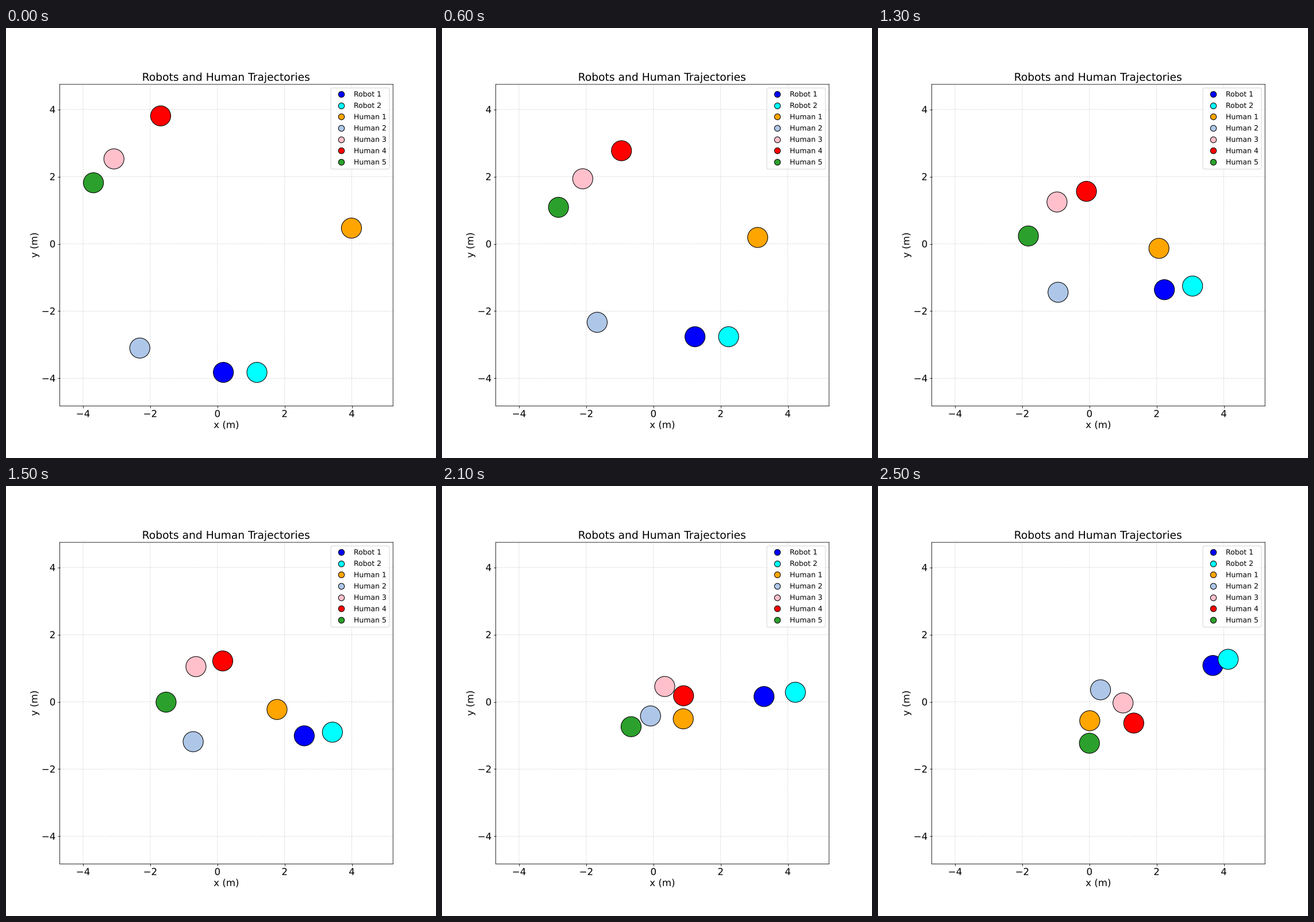
A matplotlib script that plays this animation: 748 by 748 pixels, repeating every 2.6 s.

```python
import numpy as np
import matplotlib.pyplot as plt
from matplotlib.animation import FuncAnimation
from matplotlib.lines import Line2D
from matplotlib.patches import Circle
from matplotlib.patheffects import Normal
from matplotlib.text import Text

FRAMES, INTERVAL = 26, 100
RADIUS = 0.3
STEP = 0.25  # metres a robot covers per frame
EVADE = 22  # frame at which the humans start to dodge each other


def robot_path(start, *legs):
    """Constant speed along legs of (heading in degrees, frames)."""
    headings, counts = zip(*legs)
    angles = np.radians(np.repeat(headings, counts))
    steps = STEP * np.column_stack([np.cos(angles), np.sin(angles)])
    return start + np.cumsum(steps, axis=0)


def human_path(start, turn, end):
    """A steady walk to the turn, then a quick dodge to the end."""
    t = np.arange(FRAMES)
    keys = [0, EVADE, FRAMES - 1]
    return np.column_stack([np.interp(t, keys, axis)
                            for axis in zip(start, turn, end)])


agents = [
    ("Robot 1", "blue", robot_path(
        (0, -4), (45, 11), (67.5, 3), (45, 6), (112.5, 1), (67.5, 5))),
    ("Robot 2", "cyan", robot_path(
        (1, -4), (45, 8), (67.5, 5), (45, 7), (67.5, 1), (90, 4), (112.5, 1))),
    ("Human 1", "orange", human_path((3.99, 0.47), (0.74, -0.55), (0.01, -0.56))),
    ("Human 2", "#aec7e8", human_path((-2.31, -3.1), (0.02, -0.29), (0.33, 0.36))),
    ("Human 3", "pink", human_path((-3.08, 2.53), (0.5, 0.36), (1, -0.03))),
    ("Human 4", "red", human_path((-1.69, 3.81), (1.02, 0.01), (1.32, -0.63))),
    ("Human 5", "#2ca02c", human_path((-3.69, 1.82), (-0.52, -0.86), (0, -1.23))),
]

plt.rcParams.update({"font.family": "DejaVu Sans", "path.snap": False})
fig, ax = plt.subplots(figsize=(10, 10), dpi=74.8)
ax.set_aspect("equal")
ax.set(xlim=(-4.693, 5.226), ylim=(-4.823, 4.749),
       xticks=range(-4, 5, 2), yticks=range(-4, 5, 2))
ax.tick_params(labelsize=16)
ax.set_xlabel("x (m)", fontsize=16)
ax.set_ylabel("y (m)", fontsize=16)
ax.set_title("Robots and Human Trajectories", fontsize=18)
ax.grid(True, linestyle="--", alpha=0.5)

discs = [
    ax.add_patch(Circle(path[0], RADIUS, facecolor=color, edgecolor="black",
                        linewidth=1, zorder=3))
    for _, color, path in agents
]
handles = [
    Line2D([], [], linestyle="none", marker="o", markersize=10,
           markerfacecolor=color, markeredgecolor="black", label=name)
    for name, color, _ in agents
]
ax.legend(handles=handles, loc="upper right", fontsize=12, labelspacing=0.537)

# Draw text as outlines so that glyphs keep their subpixel positions.
for text in fig.findobj(Text):
    text.set_path_effects([Normal()])


def update(frame):
    for disc, (_, _, path) in zip(discs, agents):
        disc.center = path[frame]
    return discs


anim = FuncAnimation(fig, update, frames=FRAMES, interval=INTERVAL,
                     repeat=True, repeat_delay=0)
plt.show()
```
